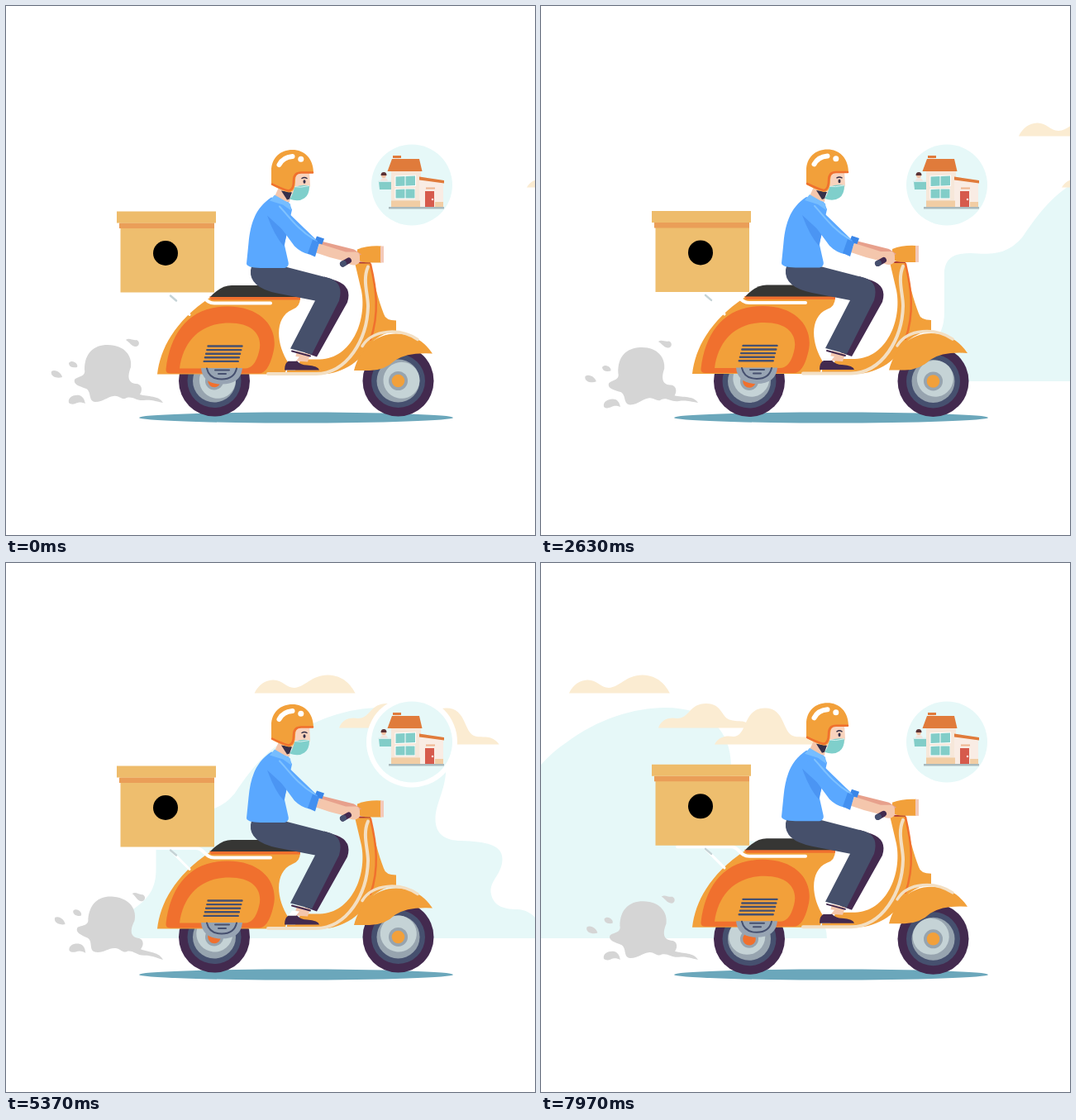
Recreate the animation shown at these times as an HTML page. Size 640x640 px, loop 8 s.

```html
<!DOCTYPE html>
<html lang="en">
<head>
<meta charset="utf-8">
<title>Delivery scooter</title>
<style>
html, body { margin: 0; width: 100%; height: 100%; overflow: hidden; background: #fff; }
svg { display: block; width: 100%; height: 100%; }
.line { fill: none; stroke-linecap: round; stroke-linejoin: round; }
</style>
</head>
<body>
<svg viewBox="0 0 640 640">
  <defs>
    <g id="wheel">
      <circle r="43" fill="#432a4f"/>
      <circle r="32.5" fill="#46506f"/>
      <circle r="26" fill="#97a4af"/>
    </g>
  </defs>

  <!-- scenery, each part drawn from its left end -->
  <path id="hill" fill="#e6f8f8" d="M0 454C-1 434 12 427 26 417C44 404 51 392 51 370V325C51 304 64 299 83 299C112 301 128 300 146 279C164 252 180 232 203 217C240 189 285 175 322 175C378 175 402 206 402 245C402 275 389 290 389 310C389 328 401 336 420 336C450 337 470 341 470 358C470 376 455 384 456 398C458 414 470 419 488 419C508 420 518 436 518 454Z"/>
  <g fill="#fbecd2">
    <path id="cloud1" d="M0 157.500C5 147 13 142 22 141.500C34 141 38 151 48 151C62 150 68 136 89 135.500C108 136 117 148 122 157.500Z"/>
    <path id="cloud2" d="M0 199.500C4 189 13 186 23 188C38 188 37 170 58 170C78 170 76 188 88 190C98 193 106 188 112 199.500Z"/>
    <path id="cloud3" d="M0 219.500C5 210 14 208.500 23 210C40 210 34 175.500 61 175.500C86 175.500 82 206 96 209.500C106 212 116 207 125 219.500Z"/>
  </g>

  <!-- destination bubble -->
  <circle cx="491" cy="216.500" r="55" fill="#fff"/>
  <circle cx="491" cy="216.500" r="49" fill="#e6f8f8"/>
  <g>
    <path fill="#f6e7da" d="M466 199H502V244H466ZM470 183H476V187H470Z"/>
    <path fill="#f9ece4" d="M500 209L529 214V244H500Z"/>
    <path fill="#e07b3b" d="M461.500 200L467 185H500L503.500 200ZM468 181H478V184H468ZM500 206.500L530 211V214.500L500 210.500Z"/>
    <path fill="#f1cda4" d="M466 235.500H501V243H466ZM519 237H529V243H519Z"/>
    <path fill="#fff" d="M470.500 205.500L496 204.500V218L470.500 219ZM470.500 221L495 220.500V233.500H470.500Z"/>
    <path fill="#82cdc8" d="M471.500 206.500L482.500 206V217.500L471.500 218ZM483.500 206L495 205.500V217L483.500 217.500ZM471.500 222L482.500 221.500V232.500H471.500ZM483.500 221.500H494.500V232.500H483.500Z"/>
    <path fill="#eeb48f" d="M508 219.500H519V221.500H508Z"/>
    <path fill="#d65a4c" d="M507 224H518V243H507Z"/>
    <circle cx="516" cy="234" r="1.200" fill="#fff"/>
    <path fill="#a9b9bd" d="M463 243H530V245.500H463Z"/>
    <path fill="#f4e4dc" d="M453 213Q453 208 457 208Q462 208 462 213Z"/>
    <circle cx="457" cy="205" r="3" fill="#f0bfa2"/>
    <path fill="#5b3336" d="M453.500 205Q453.500 201 457 201Q460.500 201 460.500 205Z"/>
    <path fill="#82cdc8" d="M451 212.500H466V222H452Z"/>
    <path fill="#d9eeee" d="M450 211.500H466V213H450Z"/>
  </g>

  <ellipse cx="351" cy="498" rx="190" ry="6.500" fill="#6ba7bb"/>

  <g id="smoke" fill="#d5d5d5">
    <path d="M95 440C95 420 106 410 123 410C144 410 153 424 151 437C147 447 147 456 157 457C164 457 166 464 162 470C172 473 185 471 190 480C180 478 175 476 167 477C157 478 154 472 146 474C141 478 136 470 130 472C122 473 118 479 108 479C99 478 104 467 97 463C89 460 81 458 83 452C86 448 97 449 95 440Z"/>
    <path d="M55 442C60 439 67 444 68 449C63 451 53 449 55 442Z"/>
    <path d="M76 432C80 427 88 433 86 437C82 438 76 437 76 432Z"/>
    <path d="M145 404C150 401 152 405 158 404C163 406 161 413 156 412C151 411 150 407 145 404Z"/>
    <path d="M76 480C74 472 86 469 91 472C95 475 95 478 96 481C91 479 88 479 84 481C81 482 78 482 76 480Z"/>
  </g>

  <g id="wheels">
    <g transform="translate(252 453.500)">
      <use href="#wheel"/>
      <circle class="shine" cx="4" r="22" fill="#c5d3d6"/>
      <circle r="11" fill="#97a4af"/><circle r="7.800" fill="#f0702e"/>
    </g>
    <g transform="translate(474.500 453.500)">
      <use href="#wheel"/>
      <circle class="shine" cx="4" r="22" fill="#c5d3d6"/>
      <circle r="11.500" fill="#97a4af"/><circle r="7.800" fill="#f2a03a"/>
    </g>
  </g>

  <g id="ride">
    <!-- rear body -->
    <path fill="#f2a03a" d="M183 439C187 408 203 376 247 346H356Q356 358 346 361C325 370 326 402 342 426L337 439Z"/>
    <path fill="#f0702e" d="M193.500 433C199 388 222 357 268 357C312 357 331 386 323 414Q317 438 306 438H199Q193 438 193.500 433Z"/>
    <path fill="#f2a03a" d="M210 432C215 396 238 377 270 377C301 377 311 394 306 412Q301 432 289 432Z"/>
    <!-- engine cover -->
    <path fill="#97a4b3" d="M236 431.500H286Q284 451 261 451Q238 451 236 431.500Z"/>
    <path class="line" stroke="#46506f" stroke-width="2" d="M243 432Q246 445 261 445Q276 445 279 432M253 434H270M257 438.500H266"/>
    <path id="grill" class="line" stroke="#46506f" stroke-width="2.400"/>

    <!-- seat and rack -->
    <path fill="#f0702e" d="M246 345H356V349H248Z"/>
    <path fill="#363634" d="M247 345.500Q260 331.500 273 331.500H330L356 345.500Z"/>
    <path class="line" stroke="#fff" stroke-width="4" d="M165 341.500H230C240 341.500 240 353 252 353H320"/>
    <path class="line" stroke="#fff" stroke-width="3" d="M199 344L222 367"/>
    <path class="line" stroke="#c5d3d6" stroke-width="2.500" d="M199 344L206 350"/>

    <!-- front shield and floor -->
    <path fill="#f2a03a" d="M422 304H441C445 330 451 350 457 366Q459 374 472 374V387Q458 388 445 398C431 421 410 439 380 439H340V434H350L357 421H380C418 420 437 374 430 338Z"/>
    <path class="line" stroke="#f0702e" stroke-width="2.500" d="M441 306C448 336 452 365 441 397"/>
    <path class="line" stroke="#f3dfc3" stroke-width="4" d="M438 309C431 325 438 342 438 357C437 397 413 438 375 438.500H317"/>

    <!-- far leg and shoes -->
    <path fill="#432a4f" d="M385 321L400 326Q419 333 413 352L376 418L362 413L395 350Z"/>
    <path fill="#f4c6ac" d="M352 411L368 415L365 424L349 423Z"/>
    <path class="line" stroke="#432a4f" stroke-width="2" d="M346 411L368 417"/>
    <path fill="#432a4f" d="M337 434Q337 425 342 423L352 423Q357 428 364 428Q378 429 379 434Z"/>
    <path fill="#fff" d="M346 417L355 418L351 423H342Z"/>
    <!-- near leg -->
    <path fill="#46506b" d="M297 309H338L392 323Q409 329 403 350L370 415L344 408L374 350L328 341Q294 334 296 313Z"/>

    <!-- front fender -->
    <path fill="#f2a03a" d="M421 434.500C428 408 447 390 472 390Q500 390 516 414Q486 412 471 422Q458 434.500 440 434.500Z"/>
    <path class="line" stroke="#f3dfc3" stroke-width="3.500" d="M431 405C444 384 477 383 498 397"/>

    <!-- steering head -->
    <path class="line" stroke="#ad3b35" stroke-width="2" d="M428 304H440"/>
    <path fill="#f2a03a" d="M425 288Q438 283 454 284V304H440Q428 304 425 300Z"/>
    <path fill="#f3c9b9" d="M453 284H457V304H453Z"/>

    <!-- arms -->
    <path fill="#e7a08c" d="M381 278L421 288L430 294L420 299L378 286Z"/>
    <path fill="#3a86e8" d="M376 272L385 275L382 283L373 279Z"/>
    <path fill="#f4c6ac" d="M379 281L411 291L424 291Q428 292 428 297V303Q424 309 416 306L409 302Q391 298 375 292Z"/>
    <path class="line" stroke="#432a4f" stroke-width="7" d="M407.500 305.500L414.500 301.500"/>
    <path class="line" stroke="#46506f" stroke-width="7" d="M407.500 305.500L408.500 305"/>

    <!-- torso -->
    <path fill="#f4c6ac" d="M330 213L345 218L343 231L324 226Z"/>
    <path fill="#5aa8ff" d="M321 225C303 237 296 254 293.500 280L291 305Q291 310 308 310.500H337Q343 309 341.500 303L337 283L339 271L346 240L342 231Z"/>
    <path fill="#4b95f3" d="M316 247L340 269L336 284Q325 272 316 247Z"/>
    <path fill="#5aa8ff" d="M318 242Q330 230 345 247L377 278L367 294Q357 292 349 284Z"/>
    <path class="line" stroke="#7fc2ff" stroke-width="2" d="M331 236C343 249 353 264 373 276"/>
    <path fill="#4390f0" d="M371 276L379 280L374 297L365 293Z"/>
    <path fill="#76bdff" d="M325 222L344 233L345 241L335 234L319 229Z"/>

    <!-- head -->
    <path fill="#f8d3bd" d="M344 194H367L368 211L364 222L346 222Z"/>
    <path fill="#353049" d="M333 217L346 219L343 227L340 228Z"/>
    <path fill="#7fcfcb" d="M349 213Q357 209 367 211Q367 222 361 226Q354 231 343 227Q347 222 349 213Z"/>
    <path class="line" stroke="#d9f1ef" stroke-width="1" d="M347 212Q356 214 367 211"/>
    <path class="line" stroke="#353049" stroke-width="1.500" d="M358 202Q361 200 364 202"/>
    <ellipse cx="361" cy="206" rx="1.500" ry="2.300" fill="#353049"/>
    <path fill="#f2a03a" d="M321 210V193C321 177 332 167.500 346.500 167.500C361 167.500 372 178 372 195.500H357Q350 196 350 204Q350 219 342 219Q336 218 321 210Z"/>
    <path class="line" stroke="#f0702e" stroke-width="2.500" d="M371 195H357Q348 195 348 205Q348 216 342 217Q334 215 322 209"/>
    <path class="line" stroke="#fff" stroke-width="6" d="M330.500 185.500Q335 176.500 346.500 175.500"/>
    <circle cx="356.800" cy="178.800" r="3.500" fill="#fff"/>

    <!-- parcel box -->
    <path fill="#eebe6e" d="M138.500 256H252V340H138.500Z"/>
    <path fill="#ea9e58" d="M137 256H252V262.500H137Z"/>
    <path fill="#eebc6b" d="M134 242H254V256H134Z"/>
    <circle cx="193" cy="292.500" r="15" fill="#000"/>
  </g>
</svg>
<script>
const LOOP = 8000, SWAY = 4800;
const $ = id => document.getElementById(id);
const move = (el, x, y) => el.setAttribute('transform', `translate(${x.toFixed(2)} ${y.toFixed(2)})`);

// Smooth curve through [ms, value] pairs.
function track(...keys) {
  const slope = i => (keys[i + 1][1] - keys[i][1]) / (keys[i + 1][0] - keys[i][0]);
  const last = keys.length - 1;
  const tangents = keys.map((_, i) => {
    if (i === 0) return slope(0);
    if (i === last) return slope(last - 1);
    const a = slope(i - 1), b = slope(i);
    return a * b > 0 ? (a + b) / 2 : 0;
  });
  return t => {
    let i = 0;
    while (i < last - 1 && t > keys[i + 1][0]) i++;
    const [t0, v0] = keys[i], [t1, v1] = keys[i + 1];
    const d = t1 - t0, u = (t - t0) / d;
    if (u > 1) return v1 + tangents[i + 1] * (t - t1);
    return v0 + (v1 - v0) * u * u * (3 - 2 * u) +
      d * u * (1 - u) * ((1 - u) * tangents[i] - u * tangents[i + 1]);
  };
}

const drift = {
  hill: track([0, 688], [1430, 555], [2630, 437], [3730, 322], [4570, 224], [6130, 42], [7970, -172]),
  cloud1: track([0, 800], [2630, 578], [3730, 472], [4570, 385], [6130, 221], [7970, 34]),
  cloud2: track([0, 700], [2630, 651], [3730, 562], [4570, 482], [6130, 327], [7970, 142]),
  cloud3: track([0, 630], [2700, 630], [3730, 607], [4570, 544], [6130, 398], [7970, 210])
};

$('grill').setAttribute('d', [0, 1, 2, 3, 4]
  .map(i => `M${244.5 - i * 1.2} ${405 + i * 4.6}h41`).join(''));

const shines = document.querySelectorAll('.shine');

function draw(t) {
  const phase = 2 * Math.PI * t / SWAY;
  for (const id in drift) move($(id), drift[id](t), 0);

  move($('ride'), 0, 3.25 * (1 + Math.cos(2 * phase)));
  move($('wheels'), 0, -1.5 * Math.sin(phase));
  for (const s of shines) s.setAttribute('transform', `rotate(${t * 0.12 - 10})`);

  // The last swing settles back to rest.
  const swing = t < 6000
    ? 8.4 * Math.sin(phase)
    : 4.2 * (1 + Math.cos(Math.PI * (t - 6000) / 2400));
  $('smoke').setAttribute('transform', `rotate(${swing.toFixed(2)} 190 479)`);
}

const start = performance.now();
function tick() {
  draw((performance.now() - start) % LOOP);
  requestAnimationFrame(tick);
}
draw(0);
requestAnimationFrame(tick);
</script>
</body>
</html>
```
